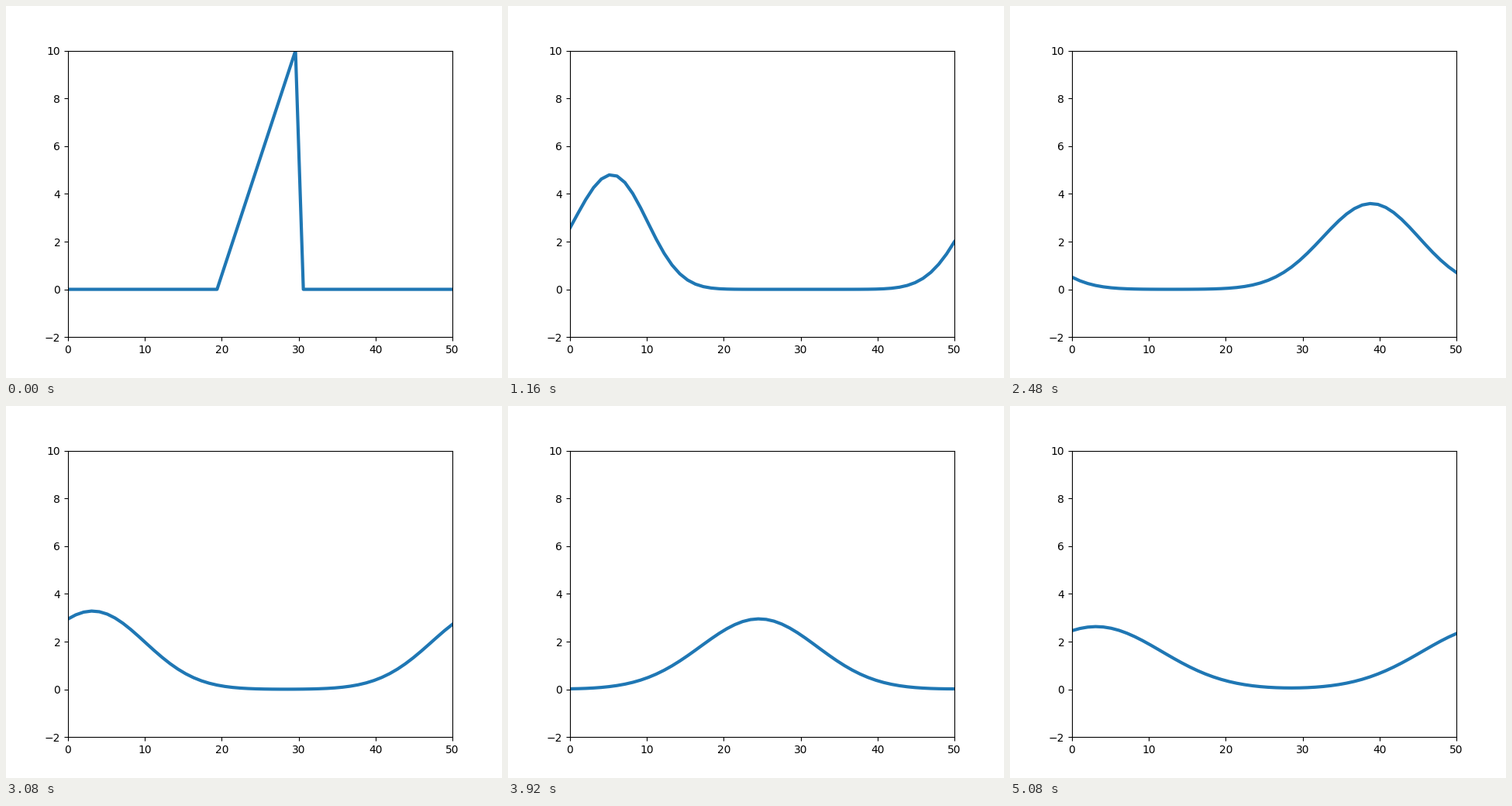
Animation of 640x480 px, one loop 5100 ms. Source, as a matplotlib script:

```python
import numpy as np
import matplotlib.pyplot as plt
from matplotlib.animation import FuncAnimation

CELLS = 50
STEPS = 255
COURANT = 0.5

x = np.linspace(0, 50, CELLS)


def initial_pulse():
    """Sawtooth: a linear ramp up to 10, then a sudden drop."""
    u = np.zeros(CELLS)
    u[20:30] = np.arange(1, 11)
    return u


def advect(u):
    """One first-order upwind step on a periodic grid."""
    return u - COURANT * (u - np.roll(u, 1))


history = [initial_pulse()]
for _ in range(STEPS - 1):
    history.append(advect(history[-1]))

fig, ax = plt.subplots(figsize=(6.4, 4.8), dpi=100)
ax.set_xlim(0, 50)
ax.set_ylim(-2, 10)
line, = ax.plot(x, history[0], color="tab:blue", lw=3)


def update(step):
    line.set_ydata(history[step])
    return line,


anim = FuncAnimation(fig, update, frames=STEPS, interval=20,
                     repeat=True, repeat_delay=0, blit=False)

plt.show()
```
